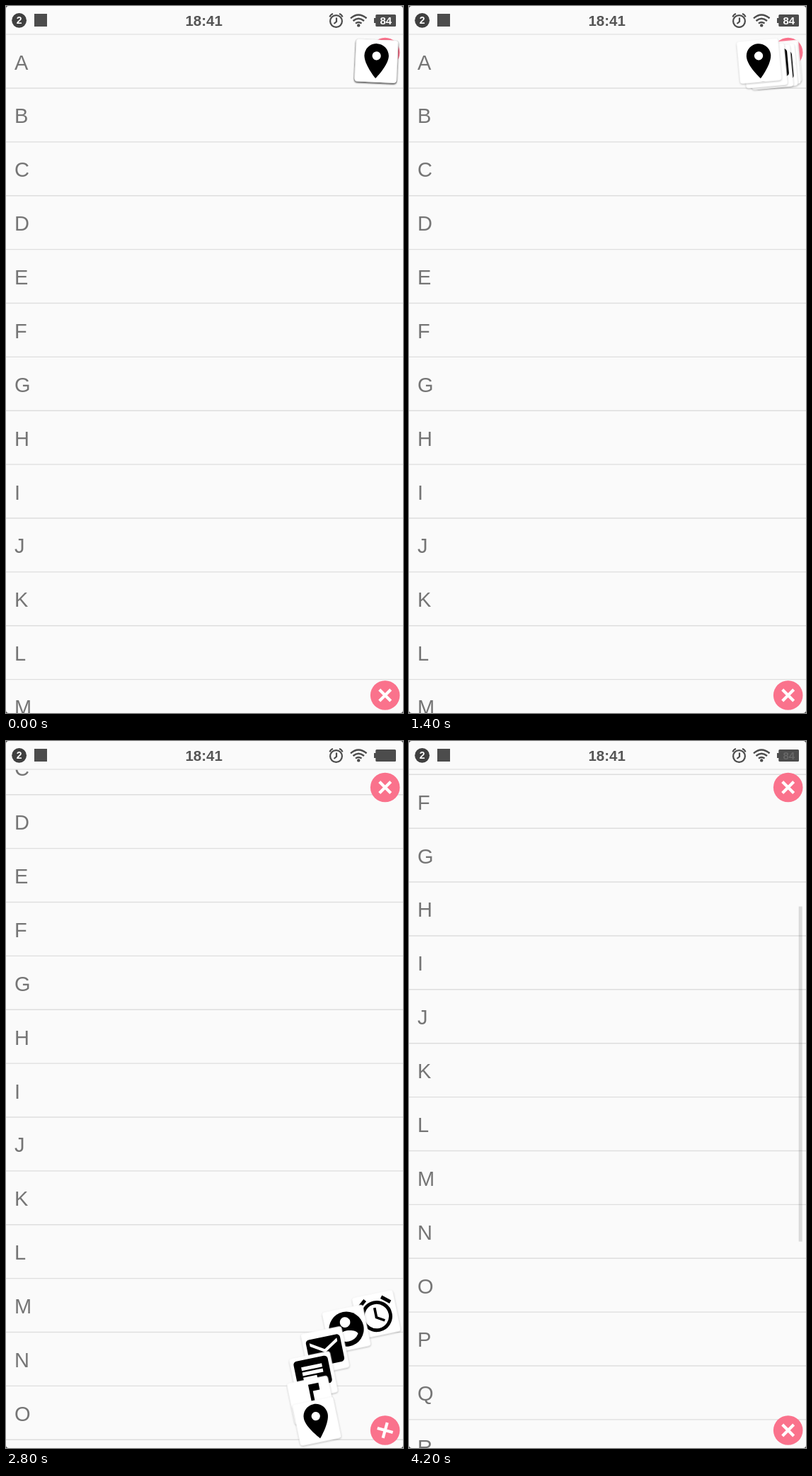
These frames come from a looping animation (561x998 px, 6100 ms). An HTML page:

```html
<!DOCTYPE html>
<html lang="en">
<head>
<meta charset="utf-8">
<title>Arc menu over a list</title>
<style>
  html, body { margin: 0; width: 100%; height: 100%; overflow: hidden; background: #444; }
  svg { display: block; width: 561px; height: 998px; }
  text { font-family: "Liberation Sans", Arial, sans-serif; }
  #rows text { font-size: 29px; fill: #757575; }
  #rows path { stroke: #dedede; stroke-width: 1.4; }
  .bold { font-weight: 700; text-anchor: middle; }
  .line { fill: none; stroke: #4c4c4c; stroke-width: 2.2; }
  .card > rect { fill: #fff; filter: drop-shadow(0 1.2px 1.3px rgba(0, 0, 0, .27)); }
  .cut { fill: #fff; }
  .slit { fill: none; stroke: #fff; stroke-width: 2; }
  .bar { fill: none; stroke: #000; stroke-width: 2; }
</style>
</head>
<body>
<svg viewBox="0 0 561 998">
  <defs>
    <clipPath id="view"><rect y="40" width="561" height="958"/></clipPath>
    <clipPath id="screen"><rect width="561" height="998" rx="4"/></clipPath>
  </defs>
  <g clip-path="url(#screen)">
    <rect width="561" height="998" fill="#fafafa"/>
    <g clip-path="url(#view)">
      <g id="rows"></g>
      <rect id="thumb" x="550.7" width="5" height="473" fill="#000"/>
    </g>
    <path d="M0 40H561" stroke="#e4e4e4" stroke-width="1.4"/>

    <g id="status" fill="#4c4c4c">
      <circle cx="18.6" cy="20.3" r="10.4" fill="#404040"/>
      <text class="bold" x="18.6" y="25.2" font-size="14" fill="#fff">2</text>
      <rect x="40" y="11" width="18" height="18"/>
      <text class="bold" x="279.7" y="28.3" font-size="20.5" fill="#555">18:41</text>
      <g class="line">
        <circle cx="466.5" cy="21.5" r="8.4"/>
        <path d="M467 16.5V22L463.5 25M457.5 15.5Q458.5 12 462 11M475.5 15.5Q474.5 12 471 11"/>
        <path d="M487 17.3Q498 7.5 509.500 17.3M490.500 21Q498 14.500 506 21M494 24.600Q498 21.500 502.500 24.600" stroke-width="2.4"/>
      </g>
      <circle cx="498.2" cy="27.4" r="2.2"/>
      <rect x="522.3" y="12" width="28.7" height="17" rx="1.5"/>
      <rect x="520" y="17" width="3" height="7"/>
      <text id="charge" class="bold" x="536.8" y="25.9" font-size="15" fill="#fff">84</text>
    </g>
    <g id="menus"></g>
  </g>
</svg>

<script>
const LOOP = 6100, STEP = 100, LAST = 4200;
const ROW = 75.88, RADIUS = 311.3;
const SPREAD = 388, LAG = 11, SPIN = 233;

const $ = id => document.getElementById(id);
const clamp = v => Math.min(1, Math.max(0, v));
const ease = v => (1 - Math.cos(Math.PI * clamp(v))) / 2;

// Ordered from the vertical end of the arc to the horizontal end
const icons = [
  // alarm
  `<circle class="bar" cx="12" cy="13" r="8"/>
   <path class="bar" d="M2.65 6.48L7.24 2.62M21.35 6.48L16.75 2.62"/>
   <path d="M12.5 8H11v6l4.750 2.850.75-1.230-4-2.370z"/>`,
  // person
  `<circle cx="12" cy="12" r="10"/><circle class="cut" cx="12" cy="8" r="3"/>
   <path class="cut" d="M6 15.980C6.030 13.990 10 12.900 12 12.900S17.970 13.990 18 15.980A7.200 7.200 0 0 1 6 15.980z"/>`,
  // mail
  `<rect x="2" y="4" width="20" height="16" rx="2"/>
   <path class="cut" d="M20 8l-8 5-8-5V6l8 5 8-5z"/>`,
  // chat
  `<path d="M4 2H20a2 2 0 0 1 2 2V16a2 2 0 0 1-2 2H6l-4 4V4a2 2 0 0 1 2-2z"/>
   <path class="slit" d="M6 7H18M6 10H18M6 13H14"/>`,
  // music
  `<circle cx="10" cy="17" r="4"/><path d="M12 3h6v4h-4v10h-2z"/>`,
  // place
  `<path d="M12 2C8.130 2 5 5.130 5 9c0 5.250 7 13 7 13s7-7.750 7-13c0-3.870-3.130-7-7-7z"/>
   <circle class="cut" cx="12" cy="9" r="2.5"/>`
];

const menus = [
  { y: 77.7, fabY: 65.5, dir: 1, open: -15, close: 1033 },
  { y: 960.3, fabY: 973, dir: -1, open: 2610, close: 3394 }
];

const scrolls = [
  { from: 1770, to: 2130, by: 192, power: 3 },
  { from: 3380, to: 3850, by: 180.2, power: 4 }
];

$('rows').innerHTML = [...'ABCDEFGHIJKLMNOPQRSTUVWXYZ'].map((letter, i) => {
  const y = 40.1 + i * ROW;
  return `<text x="12" y="${y + 49.4}">${letter}</text><path d="M0 ${y + ROW}H561"/>`;
}).join('');

$('menus').innerHTML = menus.map(m => `<g>
  <circle cx="535.7" cy="${m.fabY}" r="20.8" fill="#fa728c"/>
  <path class="fab" d="M-8-8L8 8M8-8L-8 8" stroke="#fff" stroke-width="4.2"/>
  ${icons.map(icon => `<g class="card">
    <rect x="-29.5" y="-29.7" width="59" height="59.4" rx="4"/>
    <g transform="scale(2.46) translate(-12 -12)">${icon}</g></g>`).join('')}
</g>`).join('');

menus.forEach((m, i) => {
  const g = $('menus').children[i];
  m.cards = g.querySelectorAll('.card');
  m.fab = g.querySelector('.fab');
});

function drawMenu(m, t) {
  const closing = t >= m.close;
  const age = t - (closing ? m.close : m.open);
  const total = SPREAD + LAG * (icons.length - 1);
  const shown = age >= 0 && !(closing && age > total);
  const turn = 720 * ease(age / SPREAD);
  m.cards.forEach((card, i) => {
    card.style.display = shown ? '' : 'none';
    const k = ease((age - LAG * i) / SPREAD);
    const r = RADIUS * (closing ? 1 - k : k);
    const a = i * Math.PI / 10;
    const x = 523.3 - r * Math.sin(a), y = m.y + m.dir * r * Math.cos(a);
    card.setAttribute('transform', `translate(${x} ${y}) rotate(${turn})`);
  });
  m.fab.setAttribute('transform',
    `translate(535.7 ${m.fabY}) rotate(${360 * ease(age / SPIN)})`);
}

function drawList(t) {
  let offset = 0, alpha = 0;
  for (const s of scrolls) {
    const u = clamp((t - s.from) / (s.to - s.from));
    offset += s.by * (1 - (1 - u) ** s.power);
    if (u > 0) alpha = 1 - clamp((t - s.to - 233) / 194);
  }
  $('rows').setAttribute('transform', `translate(0 ${-offset})`);
  $('thumb').setAttribute('y', 44.5 + offset * 0.508);
  $('thumb').setAttribute('opacity', alpha * 0.33);
}

function drawCharge(t) {
  const p = t % 1950;
  const alpha = p < 900 ? 1 - clamp((p - 130) / 200) : clamp((p - 900) / 250);
  $('charge').setAttribute('opacity', alpha);
}

const start = performance.now();
function frame() {
  const now = (performance.now() - start) % LOOP;
  const t = Math.min(LAST, Math.floor(now / STEP) * STEP);
  drawList(t);
  drawCharge(t);
  menus.forEach(m => drawMenu(m, t));
  requestAnimationFrame(frame);
}
frame();
</script>
</body>
</html>
```
